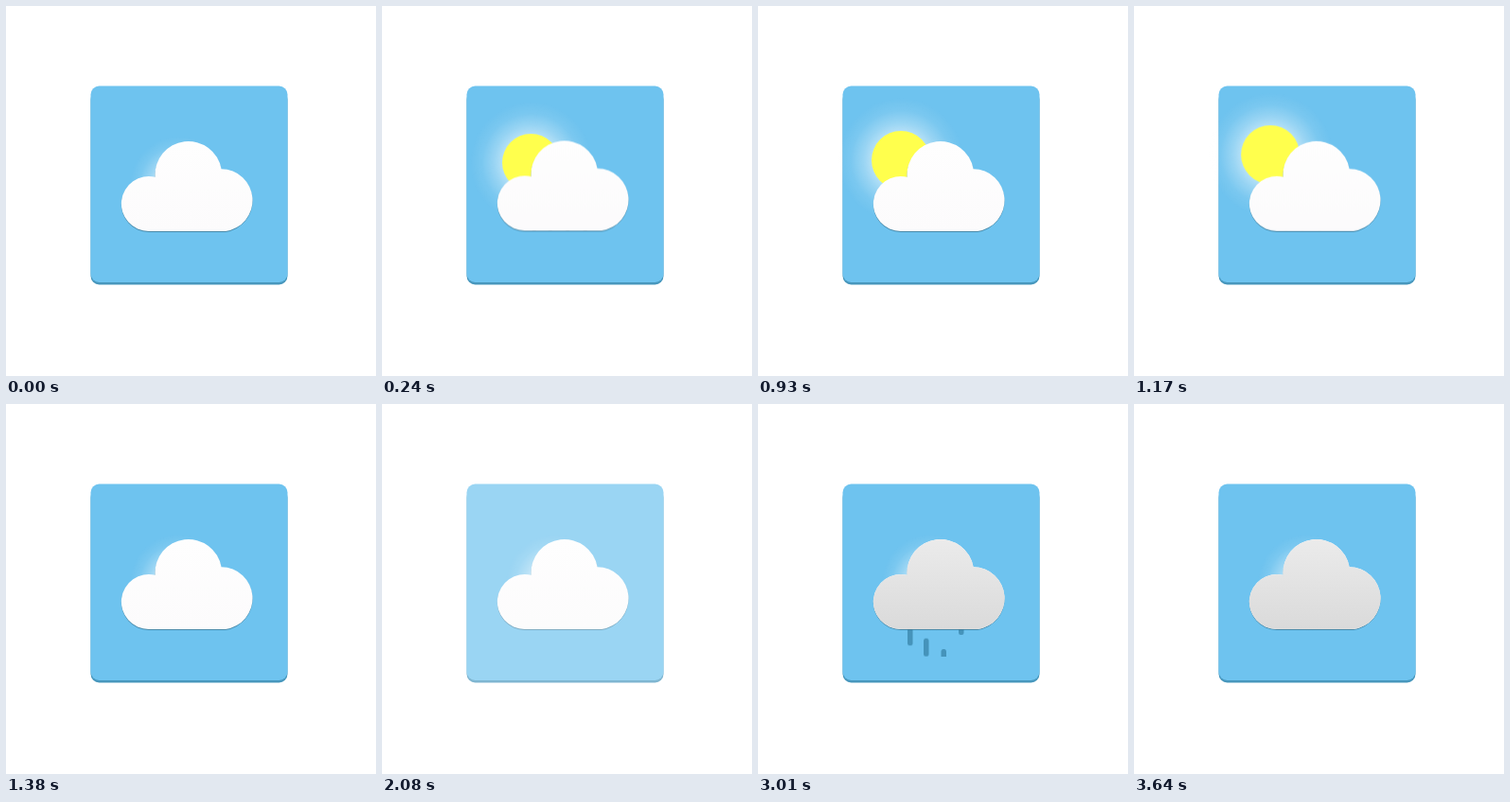
Write an HTML page that moves like this. It is 391x391 px and loops after 3.74 s.

```html
<!DOCTYPE html>
<html lang="en">
<head>
<meta charset="utf-8">
<title>Weather tile</title>
<style>
  html, body { margin: 0; width: 100%; height: 100%; overflow: hidden; background: #fff; }
  svg { display: block; width: 100vw; height: 100vh; }
  #flash, #grey { opacity: 0; }
</style>
</head>
<body>
<svg viewBox="0 0 391 391">
  <defs>
    <radialGradient id="halo">
      <stop offset=".45" stop-color="#fff" stop-opacity=".5"/>
      <stop offset=".6" stop-color="#fff" stop-opacity=".3"/>
      <stop offset=".8" stop-color="#fff" stop-opacity=".09"/>
      <stop offset="1" stop-color="#fff" stop-opacity="0"/>
    </radialGradient>
    <linearGradient id="pale" x2="0" y2="1">
      <stop stop-color="#fefefe"/>
      <stop offset="1" stop-color="#fcfbfc"/>
    </linearGradient>
    <linearGradient id="dull" x2="0" y2="1">
      <stop stop-color="#ebebeb"/>
      <stop offset="1" stop-color="#dadada"/>
    </linearGradient>
    <clipPath id="fall"><rect x="150" y="237" width="80" height="30"/></clipPath>
    <path id="shape" d="M151 238A29 29 0 1 1 157.6 180.8A35.3 35.3 0 0 1 227.6 172.3A33 33 0 0 1 232 238Z"/>
  </defs>

  <rect x="89.5" y="90" width="208" height="204.5" rx="9" fill="#4797bd"/>
  <rect x="89.5" y="84.5" width="208" height="207.5" rx="9" fill="#6ec3ef"/>

  <g id="sun">
    <circle r="66" fill="url(#halo)"/>
    <circle r="31" fill="#ffff4d"/>
  </g>

  <g id="rain" clip-path="url(#fall)" fill="#4593ba"></g>

  <g id="cloud">
    <use href="#shape" y=".9" fill="#3c7793" opacity=".75"/>
    <use href="#shape" fill="url(#pale)"/>
    <use href="#shape" id="grey" fill="url(#dull)"/>
  </g>

  <rect id="flash" x="89" y="84" width="209" height="211" rx="9" fill="#fff"/>
</svg>
<script>
const LOOP = 3740;
const $ = id => document.getElementById(id);

// Each step: [time in ms, value, easing towards the next step]
function play(el, prop, steps) {
  const all = [...steps];
  if (all[0][0] > 0) all.unshift([0, all[0][1]]);
  const last = all[all.length - 1];
  if (last[0] < LOOP) all.push([LOOP, last[1]]);
  const frames = all.map(([t, value, easing = 'linear']) =>
    ({ offset: t / LOOP, [prop]: value, easing }));
  el.animate(frames, { duration: LOOP, iterations: Infinity });
}

const at = (x, y, s = 1) => `translate(${x}px, ${y}px) scale(${s})`;
const lift = y => `translate(0px, ${y}px)`;
const hidden = at(182, 189, 0.78);

play($('sun'), 'transform', [
  [0, hidden, 'cubic-bezier(.35, 0, .75, .8)'],
  [240, at(157.5, 165.5, 0.98), 'cubic-bezier(.2, .5, .5, 1)'],
  [450, at(148, 160), 'ease-in-out'],
  [840, at(151, 163)],
  [1080, at(151, 163), 'ease-out'],
  [1180, at(144, 157), 'ease-in'],
  [1380, hidden]
]);

play($('cloud'), 'transform', [
  [0, lift(0), 'ease-out'],
  [210, lift(-0.6), 'ease-in-out'],
  [540, lift(0)],
  [1110, lift(0), 'ease-in-out'],
  [1260, lift(-0.6), 'ease-in-out'],
  [1380, lift(0)]
]);

play($('flash'), 'opacity', [
  [2080, 0],
  [2080, 0.3],
  [2120, 0.5, 'ease-out'],
  [2350, 0]
]);

play($('grey'), 'opacity', [[2090, 0], [2400, 1]]);

// Drops pass once through the clip, a quarter of a fall apart
const FALL = 720, GAP = 171, FIRST = 2410;
[193.5, 175, 158, 212].forEach((x, i) => {
  const drop = document.createElementNS('http://www.w3.org/2000/svg', 'rect');
  const box = { x, y: 219, width: 5.5, height: 19, rx: 2.5 };
  for (const key in box) drop.setAttribute(key, box[key]);
  $('rain').append(drop);
  const start = FIRST + i * GAP;
  play(drop, 'transform', [
    [start, lift(0)],
    [Math.min(start + FALL, LOOP), lift(48)]
  ]);
});
</script>
</body>
</html>
```
